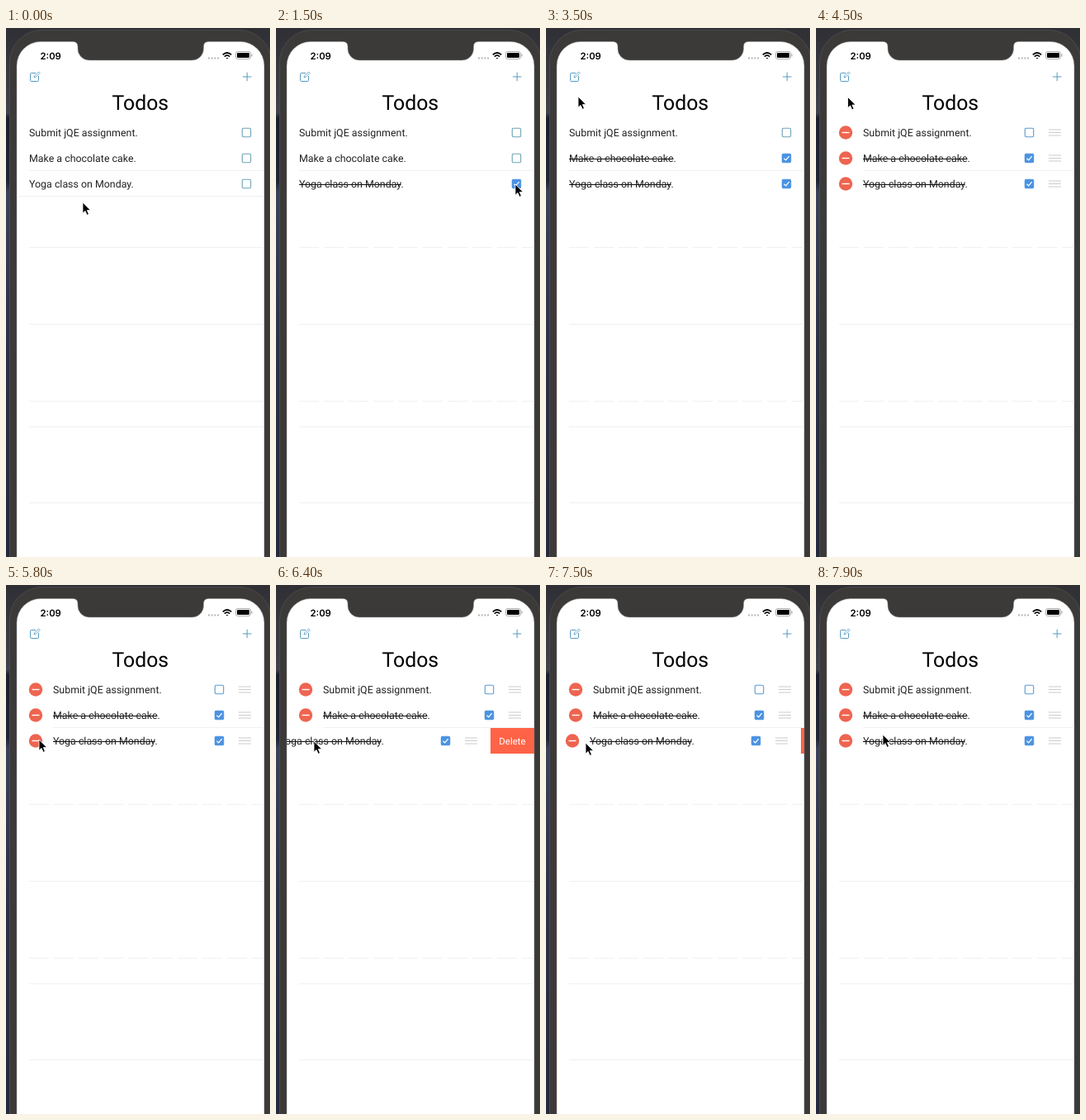
Animation of 320 by 640 pixels, one loop 8 s. Source, as an HTML page:

```html
<!DOCTYPE html>
<html lang="en">
<head>
<meta charset="utf-8">
<title>Todos</title>
<style>
  html, body { margin: 0; width: 100%; height: 100%; overflow: hidden; background: #3b3a38; }
  svg { display: block; width: 320px; height: 640px; }
  text { font-family: Roboto, "Open Sans", sans-serif; text-rendering: geometricPrecision; fill: #222; }
  .row text { font-size: 12.4px; }
  .clock { font: 600 11.3px Inter, sans-serif; fill: #000; }
  .title { font-size: 24.8px; fill: #000; text-anchor: middle; }
  .row .delete { font-size: 11.5px; fill: #fff; text-anchor: middle; }
  .icon { fill: none; stroke: #579bc0; stroke-width: 1; }
  .sep { stroke: #f0f0f0; }
</style>
</head>
<body>
<svg viewBox="0 0 320 640">
  <defs>
    <clipPath id="screen"><rect x="13" y="16" width="300" height="700"/></clipPath>
    <linearGradient id="desk" x2="0" y2="1">
      <stop offset="0" stop-color="#2f2f34"/>
      <stop offset=".16" stop-color="#40434e"/>
      <stop offset=".17" stop-color="#1b1f2d"/>
      <stop offset=".29" stop-color="#202536"/>
      <stop offset=".31" stop-color="#3a4258"/>
      <stop offset=".6" stop-color="#2b3146"/>
      <stop offset="1" stop-color="#24293d"/>
    </linearGradient>
  </defs>

  <rect width="320" height="640" fill="url(#desk)"/>
  <rect x="4.5" y="2.5" width="317" height="720" rx="39" fill="#3b3a38" stroke="#4b4a49"/>
  <path d="M13 700V45.500A29 29 0 0 1 42 16.500H81Q87 16.500 87 22.500V25A14 14 0 0 0 101 39H225.500A14 14 0 0 0 239.500 25V22.500Q239.500 16.500 245.500 16.500H284A29 29 0 0 1 313 45.500V700Z"
        fill="#fff" stroke="#8d8c8b" stroke-opacity=".5"/>

  <text class="clock" x="41.5" y="37.5">2:09</text>
  <path d="M245 36.5h13" stroke="#b5b5b5" stroke-width="1.8" stroke-dasharray="2 1.7"/>
  <g fill="none" stroke="#000" stroke-width="1.7">
    <path d="M262.800 32.300q5.200 -4.600 10.400 0M264.800 34.600q3.200 -2.800 6.400 0"/>
    <path d="M266.500 36l1.500 1.500 1.500 -1.500z" fill="#000" stroke="none"/>
  </g>
  <rect x="278.5" y="28.5" width="18" height="9" rx="2.5" fill="none" stroke="#999" stroke-width=".8"/>
  <rect x="280" y="30" width="15" height="6" rx="1.2"/>
  <path d="M298 31.500v3" stroke="#999"/>

  <g class="icon">
    <path d="M36 54.500h-5.500q-1 0 -1 1v8q0 1 1 1h8q1 0 1 -1v-5.500"/>
    <path d="M34 60l.5 -2 5 -5 1.500 1.500 -5 5z" stroke-width=".9"/>
    <path d="M287 59h10.500M292.200 53.700v10.500"/>
  </g>
  <text class="title" x="162.8" y="99">Todos</text>

  <g class="sep" id="lines"></g>
  <g id="rows" clip-path="url(#screen)"></g>
  <path id="cursor" d="M0 0V13.200L3 10.400 5.200 15.300 7.400 14.300 5.300 9.600H9.500Z" fill="#000" stroke="#fff" stroke-width=".8"/>
</svg>

<script>
const LOOP = 8000, STEP = 100;
const $ = id => document.getElementById(id);

function add(parent, tag, attrs = {}, text = "") {
  const el = document.createElementNS("http://www.w3.org/2000/svg", tag);
  set(el, attrs);
  el.textContent = text;
  return parent.appendChild(el);
}
function set(el, attrs) {
  for (const k in attrs) el.setAttribute(k, attrs[k]);
}
const shift = (el, x, y = 0) => set(el, { transform: `translate(${x} ${y})` });
const fade = (el, amount) => set(el, { opacity: +amount });

// list separators
const line = (y, x = 28) => add($("lines"), "path", { d: `M${x} ${y}.5H313` });
const rowLine = line(172), lastLine = line(203, 13);
const dashed = [line(265), line(451)];
[358, 482, 574].forEach(y => line(y));

function makeRow(label, y, checkAt) {
  const g = add($("rows"), "g", { class: "row" });
  shift(g, 0, y);
  const red = add(g, "rect", { y: -15.5, height: 31, fill: "#ff6347" });
  const del = add(g, "text", { class: "delete", y: 4 }, "Delete");
  const body = add(g, "g");

  const minus = add(body, "g");
  add(minus, "circle", { r: 8.2, fill: "#ee6450" });
  add(minus, "path", { d: "M-4.5 0H4.5", stroke: "#fff", "stroke-width": 1.4 });

  const text = add(body, "g");
  const words = add(text, "text", { y: 4.5 }, label);
  const strike = add(text, "path", { stroke: "#111", "stroke-width": 1.2 });

  const box = add(body, "g");
  const frame = add(box, "rect", { x: -5.2, y: -5.2, width: 10.4, height: 10.4, rx: 1.5, "stroke-width": 1.1 });
  const check = add(box, "path", { d: "M-3 .2L-.8 2.4 3.2 -2.4", fill: "none", stroke: "#fff", "stroke-width": 1.3 });

  const grip = add(body, "path", { d: "M-7.5 -3.5h15m-15 3.5h15m-15 3.5h15", stroke: "#cbcbce", "stroke-width": 1.1 });

  return (t, edit, swipe) => {
    const done = t >= checkAt;
    const outline = edit > 0 ? "#5a9bd2" : "#6ea3b6";
    shift(body, -swipe);
    shift(minus, 32 + 4 * edit);
    fade(minus, edit);
    shift(text, 28 + 29 * edit);
    set(strike, { d: `M0 1H${words.getSubStringLength(0, label.length - 1)}` });
    fade(strike, done);
    shift(box, 291.5 - 33 * edit);
    set(frame, { fill: done ? "#4a92e2" : "#fff", stroke: done ? "#4a92e2" : outline });
    fade(check, done);
    shift(grip, 293 - 3.5 * edit);
    fade(grip, edit);
    set(red, { x: 313 - swipe, width: swipe });
    set(del, { x: 339.5 - swipe });
  };
}

const rows = [
  makeRow("Submit jQE assignment.", 126.5, Infinity),
  makeRow("Make a chocolate cake.", 157.5, 2200),
  makeRow("Yoga class on Monday.", 188.5, 1500)
];

// pointer tip: time, x, y
const path = [
  [0, 93, 211], [500, 256, 176], [700, 256, 176], [1000, 299, 188], [1300, 290, 189],
  [1600, 290, 189], [2000, 291, 159], [2300, 291, 159], [2500, 284, 150], [3200, 131, 66],
  [3500, 39, 83], [3700, 33, 57], [4300, 33, 57], [4700, 44, 110], [5200, 38, 190],
  [5400, 38, 190], [5800, 40, 187], [6100, 40, 188], [6400, 46, 189], [7200, 48, 191],
  [7500, 48, 191], [7900, 81, 181], [8000, 81, 181]
];
function pointer(t) {
  const i = path.findIndex(k => k[0] > t);
  const [t0, x0, y0] = path[i - 1], [t1, x1, y1] = path[i];
  const u = (t - t0) / (t1 - t0), e = u * u * (3 - 2 * u);
  return [x0 + (x1 - x0) * e, y0 + (y1 - y0) * e];
}

const easeOut = (t, start, time) => 1 - (1 - Math.min(1, Math.max(0, (t - start) / time))) ** 3;

function draw(t) {
  const edit = easeOut(t, 3700, 500);
  const swipe = 53 * (easeOut(t, 5900, 400) - easeOut(t, 7200, 520));
  rows.forEach((row, i) => row(t, edit, i === 2 ? swipe : 0));
  shift($("cursor"), ...pointer(t));
  set(rowLine, { d: `M${28 + 29 * edit} 172.5H313` });
  fade(lastLine, t < 300);
  dashed.forEach(el => set(el, { "stroke-dasharray": t < 300 ? "none" : "24 6" }));
}

function play(now) {
  draw(Math.floor((now % LOOP) / STEP) * STEP);
  requestAnimationFrame(play);
}
draw(0);
requestAnimationFrame(play);
</script>
</body>
</html>
```
